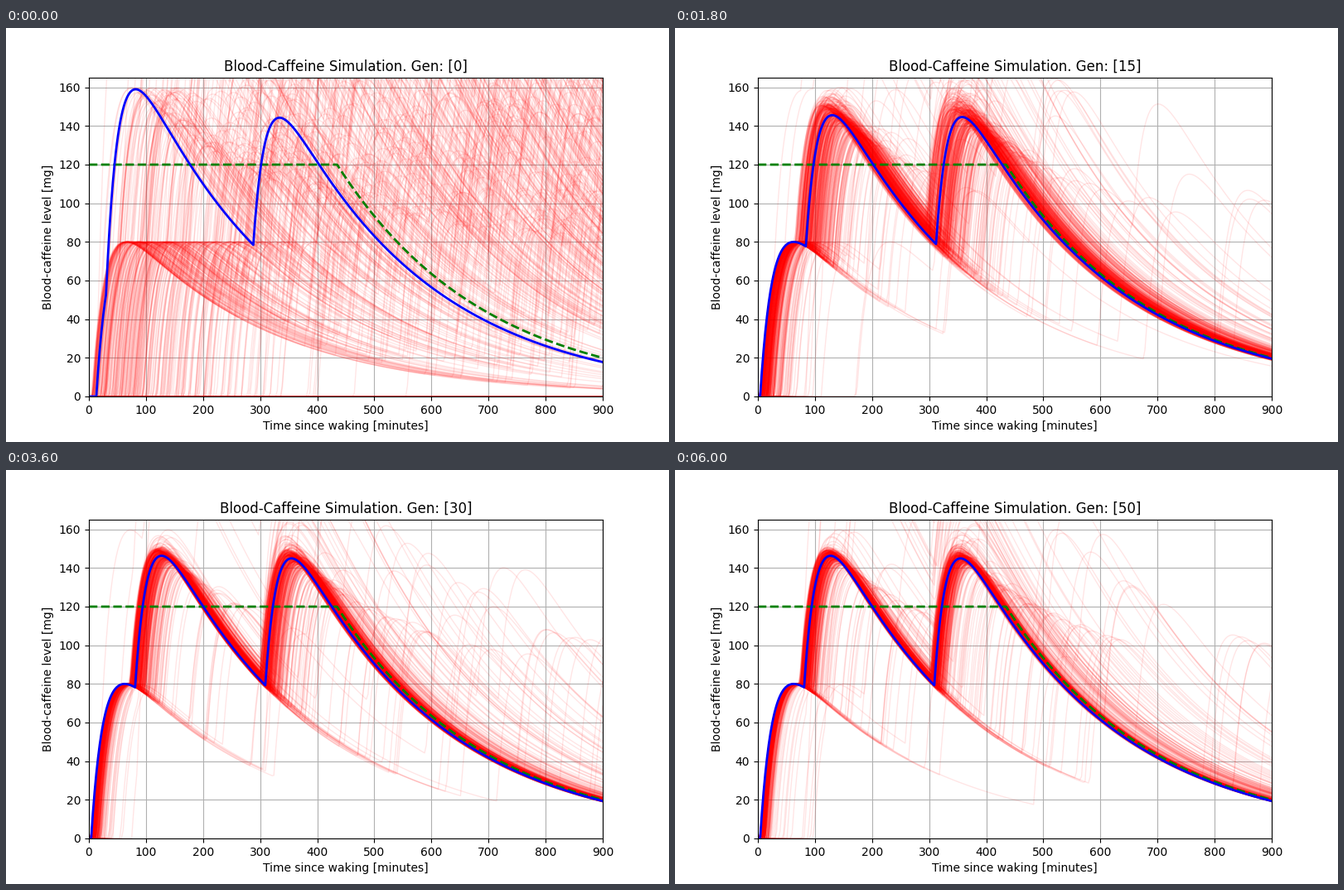
Recreate the animation shown at these times as a matplotlib script. Size 800x500 px, loop 6.12 s.

```python
import numpy as np
import matplotlib.pyplot as plt
from matplotlib.animation import FuncAnimation
from matplotlib.collections import LineCollection

GENERATIONS = 51
POP = 380
DAY = 900
K_OUT = np.log(2) / 180   # elimination rate per minute
K_IN = np.log(2) / 15     # absorption rate per minute
T_PEAK = np.log(K_IN / K_OUT) / (K_IN - K_OUT)
SCALE = 80 / (np.exp(-K_OUT * T_PEAK) - np.exp(-K_IN * T_PEAK))

# generation from which each best schedule holds, with its dose times
BEST = [
    (0, (13, 30, 288)),
    (1, (10, 52, 296)),
    (3, (8, 74, 303)),
    (6, (6, 88, 307)),
    (9, (5, 93, 310)),
    (13, (4, 84, 312)),
    (18, (4, 81, 309)),
]


def blood_level(doses, t):
    """Caffeine over time for rows of dose times (inf means no dose)."""
    age = np.maximum(t[None, :, None] - doses[:, None, :], 0)
    return SCALE * (np.exp(-K_OUT * age) - np.exp(-K_IN * age)).sum(axis=2)


def best_doses(gen):
    return [doses for start, doses in BEST if start <= gen][-1]


def random_schedules(rng, n):
    gaps = rng.exponential(220, (n, 6))
    gaps[:, 0] = 4 + rng.exponential(105, n)
    return np.cumsum(gaps, axis=1)


def evolved_schedules(rng, gen, n):
    first, second, third = best_doses(gen)
    spread = 5 + 35 * np.exp(-gen / 11)
    doses = np.full((n, 6), np.inf)
    doses[:, 0] = first + rng.exponential(0.8 * spread, n)
    doses[:, 1] = second + spread * (rng.gamma(2.5, 1, n) - 1.6)
    doses[:, 2] = third + spread * (rng.gamma(2.5, 1, n) - 1.6)

    def mutate(col, chance, values):
        hit = rng.random(n) < chance
        doses[hit, col] = values[hit]

    mutate(0, 0.05, first + rng.exponential(50, n))
    mutate(1, 0.11, second + rng.exponential(100, n))
    mutate(2, 0.13, third + rng.exponential(100, n))
    mutate(3, 0.06, rng.uniform(0, DAY, n))
    return doses


def population(gen):
    rng = np.random.default_rng(100 + gen)
    wild = random_schedules(rng, POP)
    if gen == 0:
        wild[:60] = np.inf
        return wild
    doses = evolved_schedules(rng, gen, POP)
    stray = rng.random(POP) < np.exp(-gen / 2.8)
    doses[stray] = wild[stray]
    return doses


fig, ax = plt.subplots(figsize=(8, 5), dpi=100)
ax.set(xlim=(0, DAY), ylim=(0, 165),
       xticks=range(0, DAY + 1, 100), yticks=range(0, 161, 20),
       xlabel="Time since waking [minutes]",
       ylabel="Blood-caffeine level [mg]")
ax.grid(True)
title = ax.set_title("")

coarse = np.arange(0, DAY + 1, 3.0)
minutes = np.arange(0, DAY + 1, 1.0)
crowd = LineCollection([], colors="red", linewidths=1, alpha=0.1, zorder=2)
ax.add_collection(crowd, autolim=False)

limit = np.minimum(120, 20 * np.exp(K_OUT * (DAY - minutes)))
ax.plot(minutes, limit, "g--", lw=2, zorder=2.1)
best_line, = ax.plot([], [], "b-", lw=2, zorder=2.2)


def draw(gen):
    levels = blood_level(population(gen), coarse)
    times = np.broadcast_to(coarse, levels.shape)
    crowd.set_segments(np.stack([times, levels], axis=2))
    best = np.array([best_doses(gen)], dtype=float)
    best_line.set_data(minutes, blood_level(best, minutes)[0])
    title.set_text(f"Blood-Caffeine Simulation. Gen: [{gen}]")
    return crowd, best_line, title


anim = FuncAnimation(fig, draw, frames=GENERATIONS, interval=120,
                     repeat=True, repeat_delay=0)
plt.show()
```
